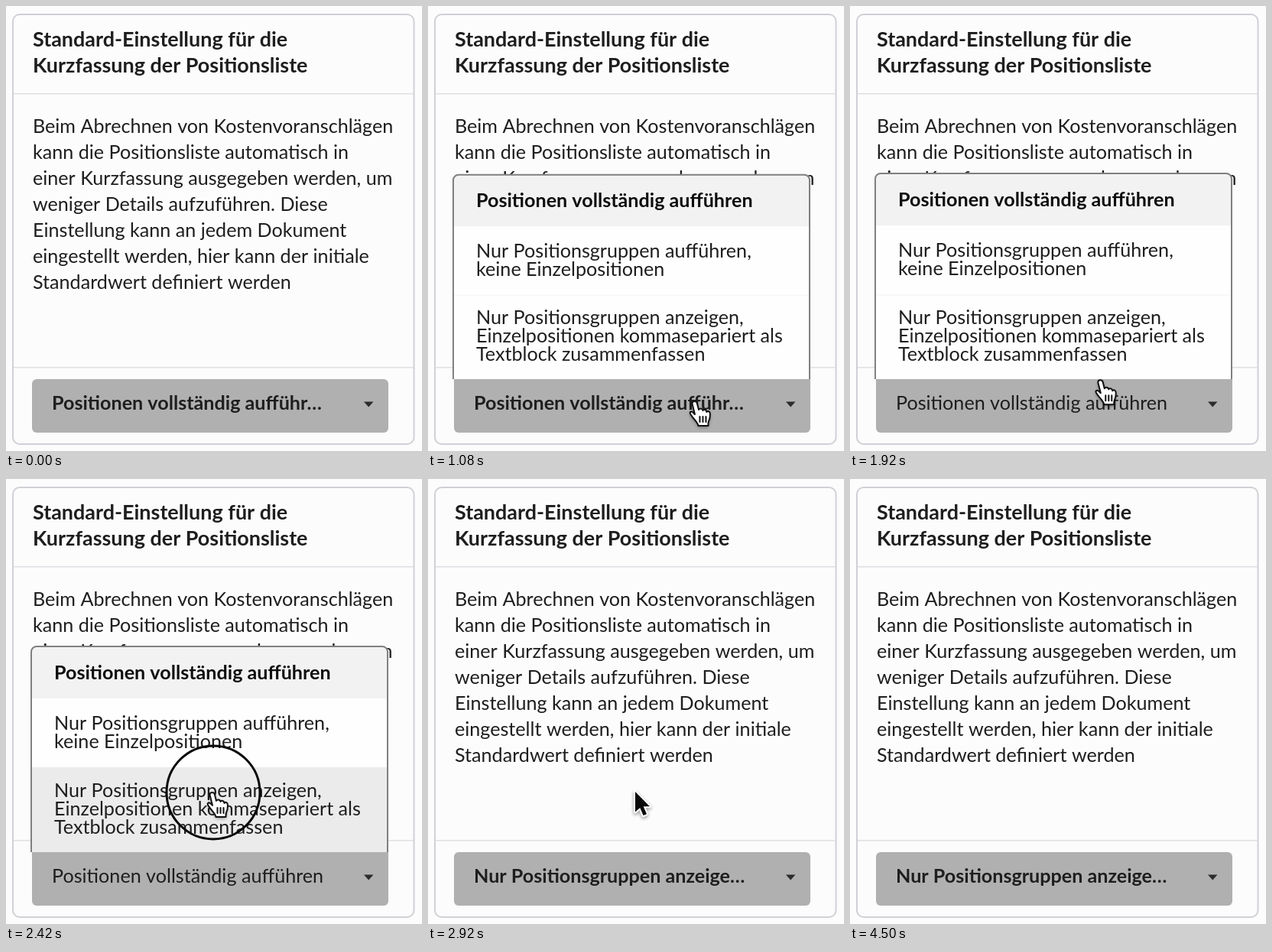
Recreate the animation shown at these times as an HTML page with a canvas. Size 544 by 582 pixels, loop 4580 ms.

```html
<!DOCTYPE html>
<html lang="de">
<head>
<meta charset="utf-8">
<title>Standard-Einstellung</title>
<style>
html, body { margin: 0; width: 544px; height: 582px; overflow: hidden; background: #fcfcfc; }
canvas { display: block; }
</style>
</head>
<body>
<canvas id="stage" width="544" height="582"></canvas>
<script>
const ctx = document.getElementById('stage').getContext('2d');
const LOOP = 4580, STEP = 1000 / 12;
const INK = '#1e1e1e', LINE = '#d0d0d6', PAPER = '#fcfcfc';
const MENU = { x: 33, y: 219, w: 466, bottom: 488 };

const BODY = [
  'Beim Abrechnen von Kostenvoranschlägen',
  'kann die Positionsliste automatisch in',
  'einer Kurzfassung ausgegeben werden, um',
  'weniger Details aufzuführen. Diese',
  'Einstellung kann an jedem Dokument',
  'eingestellt werden, hier kann der initiale',
  'Standardwert definiert werden'
];
const HAND = new Path2D(
  'M-2.500 3C-2.500-1 3.500-1 4 3L6 11C7 9 11 9 11.500 12C13 10 16 11 16.500 14' +
  'C18 12 21 13 21 17L20.500 22C20 25 18.500 26 18.500 29L18.500 32H5.500' +
  'C5 28 0 24-4 18C-7 14-4 12-1 15L1 17Z');
const CREASES = new Path2D('M7.500 20V27M11.500 20V27M15.500 20V27');
const ARROW = new Path2D('M0 0V26.500L6.200 20.800L10.500 31L15 29.100L10.700 19.200H19Z');

const clamp = v => Math.max(0, Math.min(1, v));
const prog = (t, a, b) => clamp((t - a) / (b - a));
const easeOut = p => 1 - (1 - p) ** 3;
const easeInOut = p => p * p * (3 - 2 * p);

function text(s, x, y, weight = 400, size = 25.15, color = INK) {
  ctx.font = `${weight} ${size}px Lato, sans-serif`;
  ctx.fillStyle = color;
  ctx.fillText(s, x, y);
}

function box(x, y, w, h, r, fill, stroke, width) {
  ctx.beginPath();
  ctx.roundRect(x, y, w, h, r);
  if (fill) { ctx.fillStyle = fill; ctx.fill(); }
  if (stroke) { ctx.strokeStyle = stroke; ctx.lineWidth = width; ctx.stroke(); }
}

function card() {
  ctx.fillStyle = PAPER;
  ctx.fillRect(0, 0, 544, 582);
  box(9, 11, 524.5, 562, 9, null, LINE, 2);
  ctx.fillStyle = '#dfdfe4';
  ctx.fillRect(10, 114, 523, 1.5);
  ctx.fillRect(10, 472, 523, 1.5);
  text('Standard-Einstellung für die', 35, 53, 700, 26.95);
  text('Kurzfassung der Positionsliste', 35, 87, 700, 26.95);
  BODY.forEach((s, i) => text(s, 35, 166 + i * 34));
}

function button(label, weight, open) {
  box(34, 488, 466, 70, open ? [0, 0, 6, 6] : 6, '#b0b0b0');
  text(label, 60, 528, weight);
  ctx.fillStyle = '#2c2c2c';
  ctx.beginPath();
  ctx.moveTo(468, 517.5);
  ctx.lineTo(480.5, 517.5);
  ctx.lineTo(474.2, 524.5);
  ctx.fill();
}

function menu(scale, alpha, hover) {
  const { x, y, w, bottom } = MENU;
  ctx.save();
  ctx.globalAlpha = alpha;
  ctx.translate(0, bottom);
  ctx.scale(1, scale);
  ctx.translate(0, -bottom);
  box(x, y, w, bottom - y, [8, 8, 0, 0], '#fefefe');
  ctx.save();
  ctx.clip();
  ctx.fillStyle = '#f2f2f2';
  ctx.fillRect(x, y, w, 68);
  ctx.fillStyle = '#f6f6f6';
  ctx.fillRect(x, 377, w, 1.5);
  if (hover) {
    ctx.fillStyle = '#ebebeb';
    ctx.fillRect(x, 377, w, 111);
  }
  ctx.restore();
  ctx.beginPath();
  ctx.moveTo(x, bottom);
  ctx.lineTo(x, y + 8);
  ctx.arcTo(x, y, x + 8, y, 7);
  ctx.lineTo(x + w - 8, y);
  ctx.arcTo(x + w, y, x + w, y + 8, 7);
  ctx.lineTo(x + w, bottom);
  ctx.strokeStyle = '#808080';
  ctx.lineWidth = 2;
  ctx.stroke();
  text('Positionen vollständig aufführen', 63, 261.5, 700, 25.15, '#0d0d0d');
  text('Nur Positionsgruppen aufführen,', 63, 328);
  text('keine Einzelpositionen', 63, 352);
  text('Nur Positionsgruppen anzeigen,', 63, 416);
  text('Einzelpositionen kommasepariert als', 63, 440);
  text('Textblock zusammenfassen', 63, 464);
  ctx.restore();
}

// Keys: time, x, y of the pointer's hot spot.
const PATH = [
  [160, 440, 600], [580, 353, 519], [750, 353, 519], [1000, 350, 517],
  [1750, 349, 517], [2250, 271, 410], [3080, 271, 409], [3420, 590, 560]
];

function pointerAt(t) {
  const i = PATH.findIndex(k => k[0] > t);
  if (i < 1) return null;
  const [a, x, y] = PATH[i - 1], [b, u, v] = PATH[i];
  const p = easeInOut(prog(t, a, b));
  return { x: x + (u - x) * p, y: y + (v - y) * p };
}

function pointer({ x, y }, hand) {
  ctx.save();
  ctx.translate(hand ? x - 2 : x, y);
  ctx.lineJoin = ctx.lineCap = 'round';
  ctx.shadowColor = 'rgba(0,0,0,.4)';
  ctx.shadowBlur = 4;
  ctx.shadowOffsetY = 2;
  ctx.fillStyle = ctx.strokeStyle = '#fff';
  if (hand) {
    ctx.fill(HAND);
    ctx.shadowColor = 'transparent';
    ctx.strokeStyle = '#111';
    ctx.lineWidth = 2;
    ctx.stroke(HAND);
    ctx.stroke(CREASES);
  } else {
    ctx.lineWidth = 4;
    ctx.stroke(ARROW);
    ctx.shadowColor = 'transparent';
    ctx.fillStyle = '#080808';
    ctx.fill(ARROW);
  }
  ctx.restore();
}

function ring({ x, y }) {
  ctx.beginPath();
  ctx.arc(x, y, 61, 0, Math.PI * 2);
  ctx.strokeStyle = '#080808';
  ctx.lineWidth = 3;
  ctx.stroke();
}

function draw(t) {
  const p = pointerAt(t);
  const grow = easeOut(prog(t, 920, 1120));
  const fade = easeOut(prog(t, 2500, 2700));
  const open = t > 930 && fade < 1;
  const chosen = t >= 2580;
  const overButton = p && p.x > 34 && p.x < 500 && p.y > 488 && p.y < 558;

  card();
  const label = chosen ? 'Nur Positionsgruppen anzeige…'
    : t >= 1160 ? 'Positionen vollständig aufführen' : 'Positionen vollständig aufführ…';
  button(label, !chosen && t >= 1160 ? 400 : 700, open);
  if (open) menu(grow * (1 - fade), Math.min(1, grow * 1.2) * (1 - fade), p && p.y > 377 && p.y < 488);
  if (!p) return;
  pointer(p, overButton || (open && p.y < 488));
  if ((t > 820 && t < 990) || (t > 2400 && t < 2570)) ring(p);
}

function tick(now) {
  const k = Math.floor((now % LOOP + 5) / STEP);
  draw(k * STEP);
  requestAnimationFrame(tick);
}
requestAnimationFrame(tick);
</script>
</body>
</html>
```
